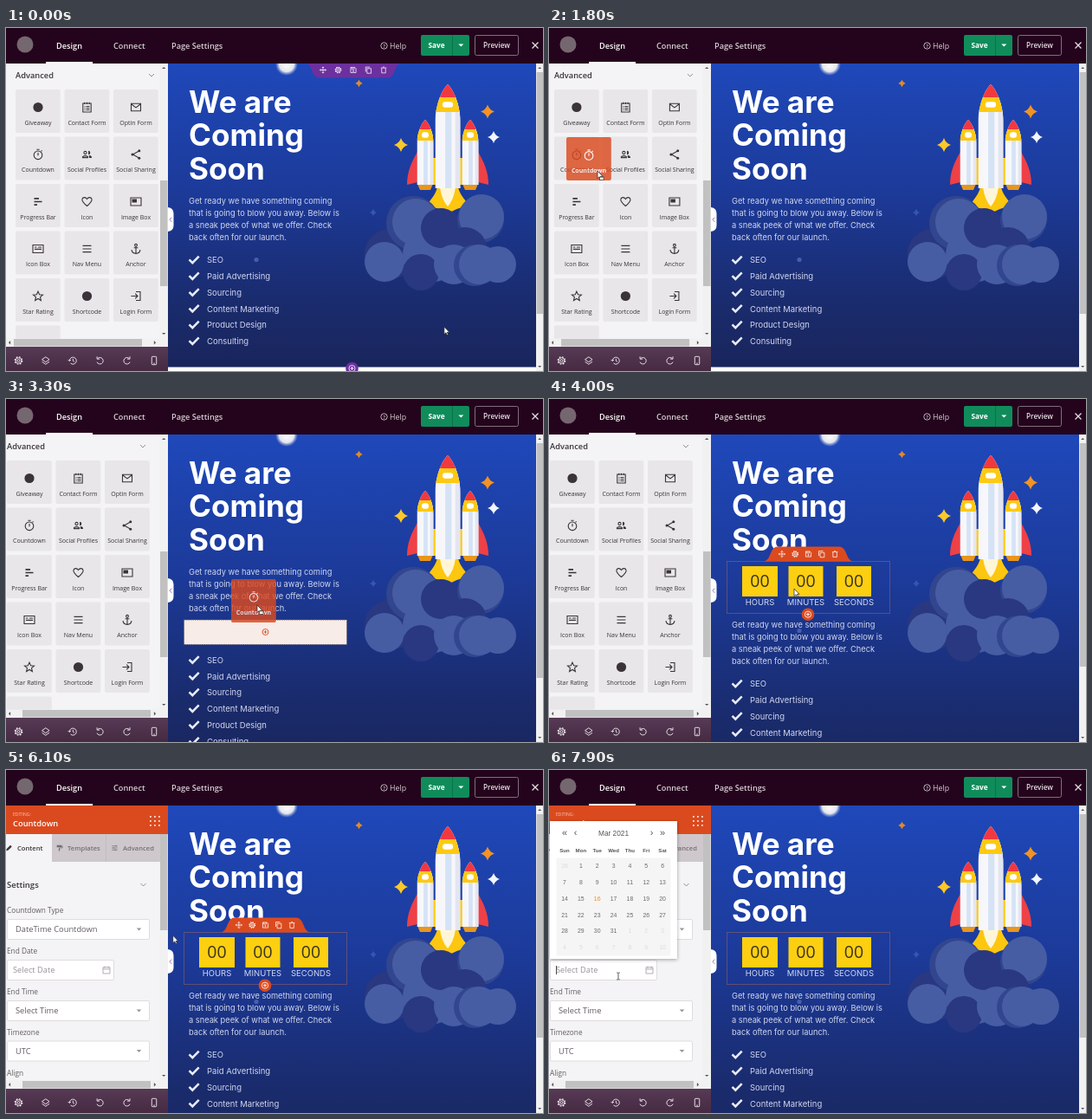
These frames come from a looping animation (620 by 396 pixels, 8 s). An HTML page:

```html
<!DOCTYPE html>
<html lang="en">
<head>
<meta charset="utf-8">
<title>Page builder</title>
<style>
html, body { margin: 0; width: 100%; height: 100%; overflow: hidden; background: #fff; }
svg { display: block; width: 620px; height: 396px; }
text { font-family: "Open Sans", sans-serif; white-space: pre; }
.inter text { font-family: Inter, sans-serif; }
.inter .digits text { font-family: "Open Sans", sans-serif; }
.cal text { font-family: "Liberation Sans", Arial, sans-serif; text-anchor: middle; }
</style>
</head>
<body>
<svg id="stage" viewBox="0 0 620 396" xmlns="http://www.w3.org/2000/svg"></svg>
<script>
const stage = document.getElementById('stage');
const LOOP = 8000;
const ORANGE = '#db4a1f', PURPLE = '#6d309f', INK = '#3a343a';

const rect = (x, y, w, h, fill, more = '') =>
  `<rect x="${x}" y="${y}" width="${w}" height="${h}" fill="${fill}" ${more}/>`;
const circle = (x, y, r, fill, more = '') => `<circle cx="${x}" cy="${y}" r="${r}" fill="${fill}" ${more}/>`;
const path = (d, fill, more = '') => `<path d="${d}" fill="${fill}" ${more}/>`;
const line = (d, color, width = 1) => path(d, 'none', `stroke="${color}" stroke-width="${width}"`);
const text = (s, x, y, size, fill, weight = 400, anchor = 'start') =>
  `<text x="${x}" y="${y}" font-size="${size}" fill="${fill}" font-weight="${weight}" text-anchor="${anchor}">${s}</text>`;
const group = (id, body, more = '') => `<g id="${id}" ${more}>${body}</g>`;

// Icons on a 12 unit grid around the origin, drawn in the current colour.
const p = d => `<path d="${d}"/>`;
const solid = d => `<path d="${d}" fill="currentColor" stroke="none"/>`;
const icons = {
  gear: '<circle r="1.7"/><circle r="3.9"/><circle r="4.9" stroke-width="1.6" stroke-dasharray="2 1.848"/>',
  layers: p('M0-5 5-1.5 0 2-5-1.5ZM-5 1.5 0 5 5 1.5'),
  history: p('M-4.5 0A4.7 4.7 0 1 1-3 3.6M-6.4-1.2-4.5 .8-2.6-1.2M.3-2.6V.4L2.2 1.6'),
  undo: p('M-3.3-2.6A4.4 4.4 0 1 1-4 2M-3.9-5.6V-2.2H-.4'),
  redo: p('M3.3-2.6A4.4 4.4 0 1 0 4 2M3.9-5.6V-2.2H.4'),
  phone: '<rect x="-3.2" y="-5.5" width="6.4" height="11" rx="1"/>' + p('M-1 3.7H1'),
  move: p('M0-5V5M-5 0H5M-1.8-3.6 0-5.4 1.8-3.6M-1.8 3.6 0 5.4 1.8 3.6M-3.6-1.8-5.4 0-3.6 1.8M3.6-1.8 5.4 0 3.6 1.8'),
  save: p('M-4.5-4.5H2.5L4.5-2.5V4.5H-4.5ZM-2.5-4.5V-1.5H1.5V-4.5') + '<circle cy="1.7" r="1"/>',
  copy: p('M-2.5-2.5H4.5V5.5H-2.5ZM-4.8 3V-5H2.5'),
  trash: p('M-3.3-3V5H3.3V-3M-4.8-3.5H4.8M-1.5-5H1.5'),
  disc: '<circle r="5.6" fill="currentColor" stroke="none"/>',
  form: p('M-4.7-4.5H4.7V5.5H-4.7ZM-2.7-5.8V-3.5M0-5.8V-3.5M2.7-5.8V-3.5M-3-1H-2M-1-1H3M-3 1H-2M-1 1H3M-3 3H-2M-1 3H3'),
  mail: p('M-5.5-4.2H5.5V4.2H-5.5ZM-5.5-3.8 0 .4 5.5-3.8'),
  timer: '<circle cy=".8" r="4.8"/>' + p('M-1.6-5.7H1.6M0-2V1.2M3.6-3.6 4.6-4.6'),
  people: '<circle cx="-2" cy="-2" r="1.6"/>' + p('M-5 3.6V2.6Q-2 .6 1 2.6V3.6Z') +
    solid('M1.6-4.2A2.2 2.2 0 0 1 1.6 .2ZM2.3 1Q5.6 1.2 5.6 4H2.6Z'),
  share: p('M3.6-4-3.6 0 3.6 4') + [[3.8, -4.2], [-4, 0], [3.8, 4.2]]
    .map(c => `<circle cx="${c[0]}" cy="${c[1]}" r="1.5" fill="currentColor" stroke="none"/>`).join(''),
  bars: `<g stroke-width="1.6">${p('M-4.5-3.6H1M-4.5 0H4.5M-4.5 3.6H-1')}</g>`,
  heart: p('M0 5C-4 1.6-5.6 0-5.6-2.3-5.6-5.2-1.8-6 0-3 1.8-6 5.6-5.2 5.6-2.3 5.6 0 4 1.6 0 5Z'),
  picture: p('M-6-4.5H6V4.5H-6Z') + solid('M-4.5-3H1V1H-4.5Z'),
  card: p('M-6-4.5H6V4.5H-6ZM-4-2H-1.5M0-2H4M-4 .4H4'),
  menu: p('M-5-3.6H5M-5 0H5M-5 3.6H5'),
  anchor: '<circle cy="-4.2" r="1.4"/>' + p('M0-2.8V5.2M-2.4-1.2H2.4M-5 1.2Q-4.4 5.2 0 5.4 4.4 5.2 5 1.2'),
  star: p('M0-5.4 1.6-1.7 5.5-1.4 2.5 1.2 3.4 5 0 3-3.4 5-2.5 1.2-5.5-1.4-1.6-1.7Z'),
  login: p('M0-5H5V5H0M-5.5 0H2M-.8-2.8 2 0-.8 2.8'),
  calendar: p('M-5-4H5V5H-5ZM-5-1.3H5M-2.6-5.6V-3M2.6-5.6V-3'),
  pencil: solid('M-5 5-4.2 1.6 2.4-5 5-2.4-1.6 4.2Z'),
  roller: solid('M-4.4-5H4.4V-1.2H-4.4ZM-1 1H1V5.5H-1Z') + p('M4-3.2H5.5V0H0V2'),
  sliders: p('M-5-3.5H5M-5 0H5M-5 3.5H5M2-5V-2M-2-1.5V1.5M1 2V5')
};
const icon = (name, x, y, k, color) =>
  `<g transform="translate(${x} ${y}) scale(${k})" color="${color}" stroke="currentColor" fill="none" stroke-width="1.1">${icons[name]}</g>`;

const tri = (x, y, r, turn, fill) =>
  `<path transform="translate(${x} ${y}) rotate(${turn})" d="M${-r} ${-r / 2}H${r}L0 ${r / 2}Z" fill="${fill}"/>`;
const chevron = (x, y) => line(`M${x - 3} ${y - 1.5}l3 3 3-3`, '#8b838a', .9);
const spark = (x, y, r, fill) =>
  path(`M${x} ${y - r}Q${x + r * .25} ${y - r * .25} ${x + r} ${y}Q${x + r * .25} ${y + r * .25} ${x} ${y + r}` +
    `Q${x - r * .25} ${y + r * .25} ${x - r} ${y}Q${x - r * .25} ${y - r * .25} ${x} ${y - r}Z`, fill);

// ---- top bar
function topBar() {
  return rect(0, 0, 620, 41, '#24041c') + circle(22, 19, 9.5, '#75676f') +
    text('Design', 58, 23.6, 9.2, '#fff', 600) + text('Connect', 124, 23.6, 9.2, '#d8cfd6', 600) +
    text('Page Settings', 191, 23.6, 9.2, '#d8cfd6', 600) + rect(46, 39, 54, 2, '#fff') +
    circle(436.5, 20.5, 3.7, 'none', 'stroke="#cfc5cc" stroke-width=".9"') +
    text('?', 436.5, 22.9, 6, '#cfc5cc', 600, 'middle') + text('Help', 443, 23.6, 8.8, '#d8cfd6') +
    rect(479, 8, 56, 24, '#108c5b', 'rx="2"') + rect(515, 8, .8, 24, '#0a6d46') +
    text('Save', 497, 23.2, 8.3, '#fff', 700, 'middle') + tri(525.3, 20, 3, 0, '#fff') +
    rect(541.5, 8.5, 50, 23, 'none', 'rx="2" stroke="#806f7b"') +
    text('Preview', 566.5, 23.2, 8.2, '#e6dfe4', 600, 'middle') +
    line('M607.5 16.5l7 7m0-7l-7 7', '#e6dfe4', 1.3);
}

// ---- widget panel
const tiles = [
  ['Giveaway', 'disc'], ['Contact Form', 'form'], ['Optin Form', 'mail'],
  ['Countdown', 'timer'], ['Social Profiles', 'people'], ['Social Sharing', 'share'],
  ['Progress Bar', 'bars'], ['Icon', 'heart'], ['Image Box', 'picture'],
  ['Icon Box', 'card'], ['Nav Menu', 'menu'], ['Anchor', 'anchor'],
  ['Star Rating', 'star'], ['Shortcode', 'disc'], ['Login Form', 'login']
];
const tileX = i => 11 + (i % 3) * 56.5;
const tileY = i => 71 + Math.floor(i / 3) * 54.5;
const tileBody = ([label, name], x, y, hot) =>
  rect(x, y, 51.8, 50, hot ? ORANGE : '#e8e6e8', 'rx="2"') +
  icon(name, x + 26, y + 20.5, 1, hot ? '#fff' : INK) +
  text(label, x + 26, y + 40.7, 7, hot ? '#fff' : INK, hot ? 700 : 400, 'middle');

function widgetPanel() {
  return text('Advanced', 11, 58.2, 9.3, INK, 600) + chevron(168, 54.5) +
    tiles.map((t, i) => tileBody(t, tileX(i), tileY(i), false)).join('') +
    rect(11, 343.5, 51.8, 50, '#e8e6e8', 'rx="2"') +
    group('hot', tiles.map((t, i) => `<g>${tileBody(t, tileX(i), tileY(i), true)}</g>`).join(''));
}

const bar = (y, h) => rect(177.5, 41, 9.5, 318, '#f1f1f1') + rect(178, y, 8.5, h, '#c1c1c1') +
  tri(182.2, 46, 2.2, 180, '#555') + tri(182.2, 353, 2.2, 0, '#555');

// ---- settings panel
const field = (y, w, value, color) => rect(1.5, y + .5, w, 23, '#fff', 'rx="1.5" stroke="#dfdcdf"') +
  text(value, w > 150 ? 11 : 8, y + 15.4, 9.3, color);
const select = (label, y, value) => text(label, 1, y - 7, 8.3, '#645d63') +
  field(y, 164, value, '#625b61') + tri(153.5, y + 12, 2.8, 0, '#9a949a');

function settingsPanel() {
  let dots = '';
  for (let i = 0; i < 9; i++) dots += rect(166 + (i % 3) * 5, 53 + Math.floor(i / 3) * 5, 1.8, 1.8, '#fbe3da');
  const tab = (x, name, label, color) => icon(name, x, 90, .65, color) +
    text(label, x + 9.5, 93, 7.6, color, 600);
  return rect(0, 41, 187, 318, '#f4f3f5') + bar(53, 132) + rect(0, 41, 187, 33, ORANGE) +
    text('EDITING:', 8, 53.3, 5, '#f6c9b8') + text('Countdown', 8, 65.3, 9.4, '#fff', 600) + dots +
    rect(53, 74, 125, 32, '#cec8cd') + rect(115, 74, .7, 32, '#c0b9bf') +
    tab(3.5, 'pencil', 'Content', INK) + tab(61.5, 'roller', 'Templates', '#756d74') +
    tab(125.5, 'sliders', 'Advanced', '#756d74') +
    text('Settings', 1, 136.3, 9.5, INK, 600) + chevron(158.5, 132.5) +
    select('Countdown Type', 172, 'DateTime Countdown') +
    text('End Date', 1, 212, 8.3, '#645d63') + field(219, 123, 'Select Date', '#98929a') +
    icon('calendar', 116, 231, .8, '#a9a3a9') +
    select('End Time', 266, 'Select Time') + select('Timezone', 312.5, 'UTC') +
    text('Align', 1, 353, 8.3, '#645d63');
}

function panelFrame() {
  const names = ['gear', 'layers', 'history', 'undo', 'redo', 'phone'];
  return rect(0, 358.5, 187, 9.5, '#f1f1f1') + rect(9, 359, 148, 8.5, '#c1c1c1', 'id="hbar"') +
    tri(4, 363.3, 2.2, 90, '#555') + tri(172, 363.3, 2.2, -90, '#555') +
    rect(0, 368, 187, 28, 'url(#foot)') +
    names.map((n, i) => icon(n, 14.5 + i * 31.3, 384, .85, '#efe8ee')).join('');
}

// ---- page preview
function ship(id, x, top, hw, red, yellow, bottom) {
  const h = bottom - top;
  const d = `M${x} ${top}C${x + hw * .45} ${top + h * .05} ${x + hw} ${top + h * .2} ${x + hw} ${top + h * .36}` +
    `V${bottom}H${x - hw}V${top + h * .36}C${x - hw} ${top + h * .2} ${x - hw * .45} ${top + h * .05} ${x} ${top}Z`;
  const mid = (red + yellow) / 2;
  return `<clipPath id="${id}">${path(d, '#000')}</clipPath><g clip-path="url(#${id})">` +
    rect(x - hw, top, hw * 2, h, '#f7f7fb') + rect(x + hw * .6, top, hw, h, '#e3e5f0') +
    rect(x - hw * .2, yellow, hw * .5, h, '#d5e3f5') +
    rect(x - hw, top, hw * 2, red - top, '#f2383f') + rect(x - hw, red, hw * 2, yellow - red, '#fdc913') +
    rect(x - hw * .42, mid - 3.2, hw * .84, 6.4, '#fff', 'rx="3"') + '</g>';
}

function rocket() {
  const fin = path('M475 143C468 155 463 166 463 181L475 178Z', '#ef4046') +
    rect(493, 150, 3.5, 31, '#fdc913') + path('M475 180H493L490 187H478Z', '#e8961c');
  const light = '#465da4', dark = '#293880', edge = '#32468f';
  const puffs = [[443, 261, 29, dark], [470, 225, 31, edge], [490, 262, 32, light], [473, 224, 27, light],
    [502, 231, 23, dark], [437, 270, 23, light], [479, 282, 21, dark], [548, 221, 27, edge], [549, 218, 26, light],
    [530, 255, 25, dark], [517, 273, 23, light], [541, 274, 24, edge], [546, 273, 23, light], [568, 273, 21, light]];
  return spark(556, 96.5, 8, '#f39323') + spark(456, 135, 8, '#fcc829') + spark(563, 126, 7, '#f4f6ff') +
    fin + `<g transform="translate(1020 0) scale(-1 1)">${fin}</g>` +
    path('M498 184C495 196 487 199 487 207Q499 206 510 214Q521 208 533 205C532 198 525 196 522 184Z', '#fdc60f') +
    path('M501 184Q503 198 510 206Q517 198 519 184Z', '#fff6d8') +
    ship('sideL', 484, 106, 9.5, 117, 130, 181) + ship('sideR', 536, 106, 9.5, 117, 130, 181) +
    ship('main', 510, 65, 14.5, 80, 97, 185) +
    puffs.map(c => circle(...c)).join('');
}

function toolbar(cx, wide, narrow, base, tip, color, pitch, y) {
  return path(`M${cx - wide} ${base}Q${cx - wide + 5} ${base} ${cx - narrow - 3} ${(base + tip) / 2}` +
    `Q${cx - narrow} ${tip} ${cx - narrow + 5} ${tip}H${cx + narrow - 5}Q${cx + narrow} ${tip} ${cx + narrow + 3} ${(base + tip) / 2}` +
    `Q${cx + wide - 5} ${base} ${cx + wide} ${base}Z`, color) +
    ['move', 'gear', 'save', 'copy', 'trash'].map((n, i) => icon(n, cx + (i - 2) * pitch, y, .68, '#fff')).join('');
}
const plus = (x, y, color) => circle(x, y, 7.3, color) +
  circle(x, y, 3.6, 'none', 'stroke="#fff" stroke-width=".8"') + line(`M${x - 2} ${y}h4m-2-2v4`, '#fff', .9);

function counter() {
  const unit = (x, w, label) => rect(x, 193, w, 35, '#fccf11') +
    `<g class="digits">${text('00', x + w / 2, 217.3, 19.5, '#3b3520', 400, 'middle')}</g>` +
    text(label, x + w / 2, 238.4, 9.5, '#d3d8ec', 400, 'middle');
  return rect(205.5, 187.5, 188, 60, 'none', 'stroke="#c0704e" stroke-opacity=".85" stroke-dasharray="1 1"') +
    unit(223, 41, 'HOURS') + unit(276.5, 40, 'MINUTES') + unit(332, 40, 'SECONDS');
}

function page() {
  const copy = ['Get ready we have something coming', 'that is going to blow you away. Below is',
    'a sneak peek of what we offer. Check', 'back often for our launch.'];
  const list = ['SEO', 'Paid Advertising', 'Sourcing', 'Content Marketing', 'Product Design', 'Consulting'];
  return rect(187, 41, 433, 355, '#fff') + rect(187, 41, 425, 350.5, 'url(#sky)', 'id="sky"') +
    circle(324, 42, 13, 'url(#moon)') + spark(407.5, 64, 4.2, '#e08a2a') +
    spark(424, 213, 4, '#3656b5') + circle(289, 267.5, 2.6, '#5a72bf', 'opacity=".7"') + rocket() +
    ['We are', 'Coming', 'Soon'].map((s, i) => text(s, 211, 97.5 + i * 38.5, 35.1, '#fff', 700)).join('') +
    group('copy', copy.map((s, i) => text(s, 211, 203.3 + i * 14, 9.27, '#d0d6ee')).join('')) +
    group('list', list.map((s, i) => line(`M211.5 ${267.3 + i * 18.75}l3.8 3.8 7.4-7.4`, '#e8ebf6', 2.6) +
      text(s, 232, 271.3 + i * 18.75, 9.5, '#d0d6ee')).join('')) +
    group('slot', rect(205.5, 187.5, 188, 28.5, '#f7ece7', 'stroke="#6b6470" stroke-dasharray="1.5 1"') +
      circle(299.5, 201.5, 3.5, 'none', `stroke="${ORANGE}" stroke-width=".9"`) +
      line('M297.7 201.5h3.6m-1.8-1.8v3.6', ORANGE, .9)) +
    group('counter', counter()) +
    group('tools', toolbar(299.5, 52, 41, 187.5, 170.5, ORANGE, 15.3, 179) + plus(299, 248.7, ORANGE)) +
    group('row', toolbar(401, 55, 45, 41, 57.5, PURPLE, 17.5, 48.5) + plus(399.5, 393, PURPLE)) +
    rect(612, 41, 8, 355, '#f1f1f1') + rect(612.7, 51, 7.3, 279, '#c1c1c1', 'id="vbar"') +
    tri(616.2, 46, 2, 180, '#555') + tri(616.2, 391, 2, 0, '#555');
}

// ---- date picker
function datePicker() {
  const col = i => 18 + i * 18.85;
  let days = '';
  for (let i = 0; i < 42; i++) {
    const n = i === 0 ? 28 : i > 31 ? i - 31 : i;
    const color = i === 0 || i > 31 ? '#dcdcdc' : i === 16 ? '#f08a24' : '#6b6b6b';
    days += text(n, col(i % 7), 113.4 + Math.floor(i / 7) * 18.75, 6.9, color);
  }
  return rect(1, 59, 147, 159, '#fff', 'filter="url(#shade)"') + rect(8.5, 101.5, 132, 113, '#f5f5f5') +
    text('«', 18, 76, 11, '#555') + text('‹', 30.5, 76, 11, '#555') + text('Mar 2021', 74.5, 76, 8.3, '#555') +
    text('›', 118.5, 76, 11, '#555') + text('»', 131, 76, 11, '#555') +
    ['Sun', 'Mon', 'Tue', 'Wed', 'Thu', 'Fri', 'Sat'].map((d, i) => text(d, col(i), 94.5, 6.1, '#555', 700)).join('') + days;
}

stage.innerHTML = `<defs>
  <linearGradient id="sky" x2="0" y2="1"><stop stop-color="#1f48ba"/><stop offset=".42" stop-color="#1c3a99"/><stop offset=".8" stop-color="#1a2b6c"/><stop offset="1" stop-color="#19255c"/></linearGradient>
  <linearGradient id="foot" x2="0" y2="1"><stop stop-color="#573a55"/><stop offset="1" stop-color="#452a42"/></linearGradient>
  <radialGradient id="moon"><stop stop-color="#fff"/><stop offset=".65" stop-color="#e4e6ee"/><stop offset="1" stop-color="#a9b4d8" stop-opacity="0"/></radialGradient>
  <filter id="shade" x="-10%" y="-10%" width="120%" height="120%"><feDropShadow dx="0" dy="1" stdDeviation="2" flood-opacity=".35"/></filter>
  <clipPath id="side"><rect y="41" width="187" height="318"/></clipPath>
  <clipPath id="view"><rect x="187" y="41" width="433" height="355"/></clipPath></defs>` +
  `<g class="inter" clip-path="url(#view)">${page()}</g>` +
  rect(0, 41, 187, 355, '#f4f3f5') +
  `<g clip-path="url(#side)">${group('widgets', widgetPanel())}${bar(176, 122)}${group('settings', settingsPanel())}</g>` +
  panelFrame() + topBar() +
  path('M187 207Q193.5 208 193.5 214V228Q193.5 234 187 235Z', '#fff') + line('M191.3 218.6l-2.4 2.6 2.4 2.6', '#8c6f9b', .9) +
  group('picker', datePicker() + rect(8, 226, .8, 10, '#222'), 'class="cal"') +
  group('ghost', tileBody(tiles[3], 0, 0, true), 'opacity=".82"') +
  group('arrow', path('M0 0V8.6L2 6.8 3.3 9.6 4.6 9 3.4 6.3H6Z', '#fff', 'stroke="#222" stroke-width=".7"') +
    rect(2.5, 7, 4.5, 3.5, '#fff', 'id="carry" stroke="#333" stroke-width=".7"')) +
  group('beam', line('M-1.8-4h1.3l.5.5.5-.5h1.3M0-3.5v7M-1.8 4h1.3l.5-.5.5.5h1.3', '#333', .8));

const el = {};
stage.querySelectorAll('[id]').forEach(n => el[n.id] = n);
const hotTiles = [...el.hot.children];

// ---- motion: [time, x, y]
const pointer = [[0, 506, 345], [100, 498, 342], [400, 300, 270], [700, 92, 200], [800, 65, 190], [900, 55, 186],
  [1200, 42, 165], [1300, 40, 160], [1750, 40, 160], [2100, 150, 195], [2400, 242, 214], [2700, 270, 232],
  [3000, 288, 240], [3300, 290, 238], [3500, 285, 222], [3600, 283, 219], [5750, 283, 219], [6100, 193, 191],
  [6600, 81, 244], [6700, 81, 247], [7250, 81, 247], [7500, 80, 238]];
const grip = [[1800, 36, 39], [2400, 37, 40], [3300, 30, 30]];

function at(keys, t) {
  const n = keys.findIndex(k => k[0] > t);
  if (n < 0) return keys[keys.length - 1].slice(1);
  if (n === 0) return keys[0].slice(1);
  const a = keys[n - 1], b = keys[n], f = (t - a[0]) / (b[0] - a[0]);
  return [1, 2].map(i => a[i] + (b[i] - a[i]) * f);
}
const show = (node, on) => node.style.display = on ? '' : 'none';
const place = (node, x, y) => node.setAttribute('transform', `translate(${x} ${y})`);
const ramp = (t, a, b) => Math.min(1, Math.max(0, (t - a) / (b - a)));

function draw(t) {
  const [x, y] = at(pointer, t);
  const dragging = t >= 1800 && t < 3600;
  const dropped = t >= 3900;
  const slot = t >= 2200 && !dropped;
  const below = t >= 2800 && t < 3450;

  const grow = dropped ? 61 : slot ? 33.5 : 0;
  place(el.copy, 0, slot && below ? 0 : grow);
  place(el.list, 0, grow);
  el.sky.setAttribute('height', 350.5 + grow);
  el.vbar.setAttribute('height', dropped ? 258 : slot ? 271 : 279);
  show(el.slot, slot);
  place(el.slot, 0, below ? 67.5 : 0);
  show(el.counter, dropped);
  show(el.tools, t >= 4000 && t < 6200);
  show(el.row, t < 800 && x > 187);

  const scroll = 10 * ramp(t, 1750, 1850);
  place(el.widgets, -scroll, 0);
  el.hbar.setAttribute('x', 9 + scroll);
  const [hx, hy] = at(pointer, Math.max(0, t - 80));
  hotTiles.forEach((n, i) => show(n, t < 1800 &&
    hx >= tileX(i) && hx < tileX(i) + 52 && hy >= tileY(i) && hy < tileY(i) + 50));

  show(el.settings, t >= 5100);
  el.settings.setAttribute('opacity', ramp(t, 5000, 5300));
  show(el.picker, t >= 7800);

  const [gx, gy] = at(grip, t);
  show(el.ghost, dragging);
  place(el.ghost, x - gx, y - gy);
  const typing = t >= 6600;
  show(el.arrow, !typing);
  show(el.carry, dragging);
  show(el.beam, typing);
  place(el.arrow, x, y);
  place(el.beam, x, y);
}

const start = performance.now();
function tick() {
  draw((performance.now() - start) % LOOP);
  requestAnimationFrame(tick);
}
draw(0);
requestAnimationFrame(tick);
</script>
</body>
</html>
```
